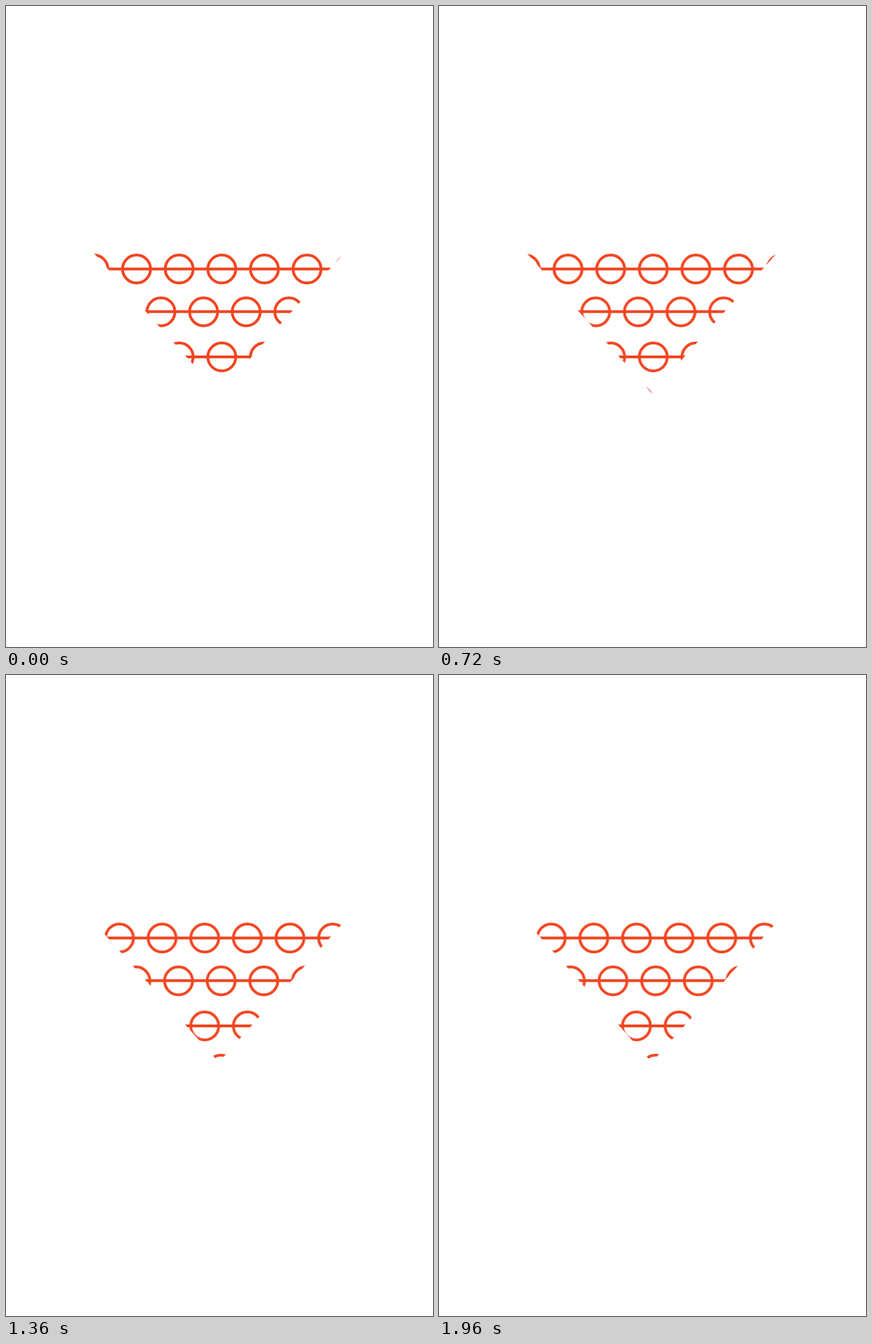
An HTML page that plays this animation: 611x917 px, repeating every 2 s.

```html
<!DOCTYPE html>
<html lang="en">
<head>
<meta charset="utf-8">
<title>Sliding rings</title>
<style>
  html, body { margin: 0; width: 100%; height: 100%; overflow: hidden; background: #fff; }
  svg { display: block; width: 611px; height: 917px; }
  .art { fill: none; stroke: #f24520; stroke-width: 4; }
  /* Each step moves about a third of the ring spacing. */
  .left { animation: left 2s steps(50) infinite; }
  .right { animation: right 2s steps(50) infinite; }
  @keyframes left { to { transform: translateX(-1022.75px); } }
  @keyframes right { to { transform: translateX(1023.75px); } }
</style>
</head>
<body>
<svg viewBox="0 0 611 917">
  <clipPath id="funnel"><path d="M126 354H483L304.5 554Z"/></clipPath>
  <g class="art" clip-path="url(#funnel)">
    <path d="M120 376.2H490M120 437.3H490M120 502H490"/>
    <g class="left" id="left"></g>
    <g class="right" id="right"></g>
  </g>
</svg>
<script>
  const SPACING = 61, COUNT = 25, RADIUS = 20;

  function addRow(id, firstX, y) {
    const group = document.getElementById(id);
    for (let i = 0; i < COUNT; i++) {
      const ring = document.createElementNS("http://www.w3.org/2000/svg", "circle");
      ring.setAttribute("cx", firstX + i * SPACING);
      ring.setAttribute("cy", y);
      ring.setAttribute("r", RADIUS);
      group.append(ring);
    }
  }

  addRow("left", 64.8, 376.2);
  addRow("left", 64.8, 502);
  addRow("right", -998.3, 437.5);
  addRow("right", -998.3, 563.7);
</script>
</body>
</html>
```
